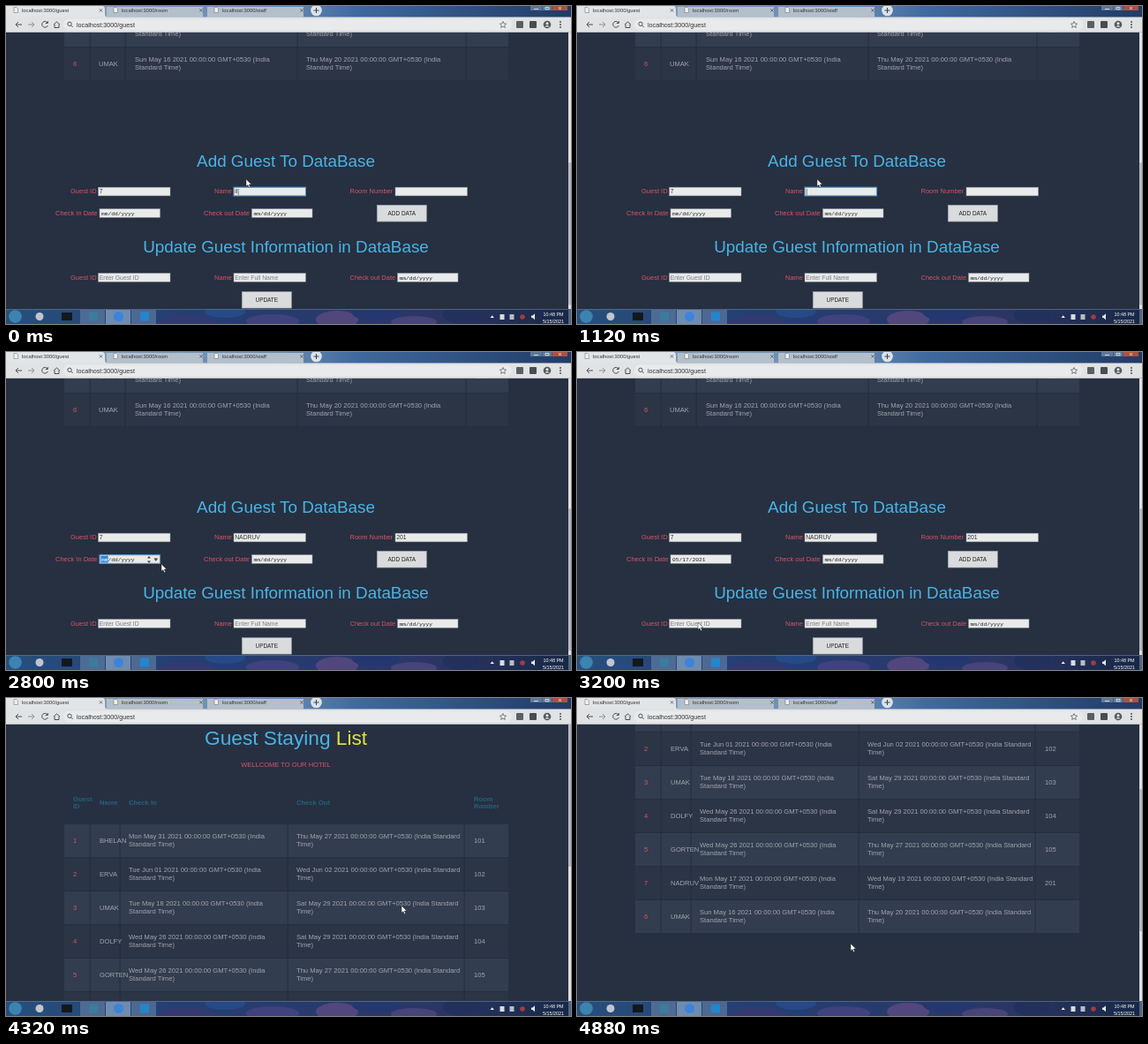
An HTML page for the animation above (4960 ms loop, 640 by 360 pixels).

```html
<!DOCTYPE html>
<html lang="en">
<head>
<meta charset="utf-8">
<title>Guest form</title>
<style>
html, body { margin: 0; width: 100%; height: 100%; overflow: hidden; background: #263041; }
svg { display: block; width: 640px; height: 360px; font-family: "Liberation Sans", Arial, sans-serif; }
.mono { font-family: "Liberation Mono", monospace; }
</style>
</head>
<body>
<svg id="stage" viewBox="0 0 640 360"></svg>
<script>
const LOOP = 4960, STEP = 80;
const PINK = '#d95266', BLUE = '#49b4e6', CELL = '#a4a3ad', INK = '#333', PAPER = '#e9eaea';

// Drawing helpers, all returning SVG markup
const rect = (x, y, w, h, fill, more = '') =>
  `<rect x="${x}" y="${y}" width="${w}" height="${h}" fill="${fill}" ${more}/>`;
const text = (x, y, size, fill, str, more = '') =>
  `<text x="${x}" y="${y}" font-size="${size}" fill="${fill}" ${more}>${str}</text>`;
const path = (d, stroke, more = '') => `<path d="${d}" fill="none" stroke="${stroke}" ${more}/>`;
const fill = (d, color, more = '') => `<path d="${d}" fill="${color}" ${more}/>`;
const dot = (x, y, r, color, more = '') => `<circle cx="${x}" cy="${y}" r="${r}" fill="${color}" ${more}/>`;
const shift = (x, y, body) => `<g transform="translate(${x} ${y})">${body}</g>`;
const middle = 'text-anchor="middle"', bold = 'font-weight="bold"';

// Timeline helpers
const latest = (keys, t) => keys.filter(k => k[0] <= t).pop()[1];
const typing = (start, word) => [...word].map((_, i) => [start + i * STEP, word.slice(0, i + 1)]);
const erasing = (start, word) => [...word].map((_, i) => [start + i * STEP, word.slice(0, -1 - i)]);

const GUEST = 'NADRUV';
const nameKeys = [[0, 'il'], ...erasing(160, 'il'), ...typing(400, 'ILVU'),
  ...erasing(800, 'ILVU'), ...typing(1280, GUEST)];
const roomKeys = [[0, ''], ...typing(2000, '201')];
const mouseKeys = [
  [0, 272, 196], [2240, 272, 196], [2640, 176, 240], [2880, 176, 240], [3120, 137, 306],
  [3200, 137, 306], [3440, 347, 239], [3600, 347, 239], [3840, 341, 306], [3920, 341, 306],
  [4160, 448, 235], [4320, 448, 235], [4560, 416, 223], [4720, 416, 223], [4880, 310, 278], [LOOP, 310, 278]
];
const ADDED = 4320;

function mouseAt(t) {
  const i = mouseKeys.findIndex(k => k[0] > t);
  const [t0, x0, y0] = mouseKeys[i - 1], [t1, x1, y1] = mouseKeys[i];
  const p = (t - t0) / (t1 - t0);
  return [x0 + (x1 - x0) * p, y0 + (y1 - y0) * p];
}

const guests = [
  [1, 'BHELAN', 'Mon May 31', 'Thu May 27', 101],
  [2, 'ERVA', 'Tue Jun 01', 'Wed Jun 02', 102],
  [3, 'UMAK', 'Tue May 18', 'Sat May 29', 103],
  [4, 'DOLFY', 'Wed May 26', 'Sat May 29', 104],
  [5, 'GORTEN', 'Wed May 26', 'Thu May 27', 105],
  [6, 'UMAK', 'Sun May 16', 'Thu May 20', '']
];
const newGuest = [7, GUEST, 'Mon May 17', 'Wed May 19', 201];

function dateCell(x, y, day, wide, color = CELL, more = '') {
  const stamp = `${day} 2021 00:00:00 GMT+0530 (India`;
  return text(x, y + 16.3, 7.6, color, stamp + (wide ? ' Standard' : ''), more) +
    text(x, y + 25.2, 7.6, color, wide ? 'Time)' : 'Standard Time)', more);
}

function table(added, hover) {
  const rows = added ? [...guests.slice(0, 5), newGuest, guests[5]] : guests;
  const edges = added ? [95, 129, 319, 519] : [95, 135, 330, 521];
  const [a, b, c, d, e] = added ? [76, 106, 139, 329, 530] : [76, 105, 146, 340, 532];
  const head = (x, y, s) => text(x, y, 7.6, '#23627f', s, bold);
  let out = text(225, 53.3, 22.7, BLUE, 'Guest Staying <tspan fill="#e4df45">List</tspan>') +
    text(317, 78, 7.55, PINK, 'WELLCOME TO OUR HOTEL', middle) +
    head(a, 117, 'Guest') + head(a, 125, 'ID') + head(b, 121, 'Name') + head(c, 121, 'Check In') +
    head(d, 121, 'Check Out') + head(e, 117, 'Room') + head(e, 125, 'Romber');
  rows.forEach(([id, name, from, to, room], i) => {
    const y = 143 + 38 * i, lit = hover && i === 2;
    out += rect(66, y, 503, 38, lit ? '#494d50' : i % 2 ? '#2b3546' : '#323d4f') +
      path(`M66 ${y + 37.5}H569` + edges.map(x => `M${x + .2} ${y}v38`).join(''), '#222c3b', 'stroke-width=".8"') +
      text(a, y + 21, 7.6, PINK, id) + text(b, y + 21, 7.6, CELL, name) +
      dateCell(c, y, from, false) + text(e, y + 21, 7.6, CELL, room);
    if (!lit) out += dateCell(d, y, to, added);
  });
  if (hover) out += rect(320, 217.2, 201.5, 38, '#8f8c30') + rect(320.7, 216.5, 201.3, 37.6, '#d0cf40') +
    dateCell(331.5, 217, guests[2][3], true, '#504e18', bold);
  return out;
}

function box(x, y, w, focused) {
  return rect(x, y + .2, w, 9.7, PAPER, `stroke="${focused ? '#5b93c2' : '#8d949c'}" stroke-width="${focused ? 1.1 : .5}"`);
}
const label = (x, y, s) => text(x, y, 7.5, PINK, s);
const field = (x, y, value, focused, color = INK) =>
  box(x, y, 81.5, focused) + text(x + 1.2, y + 7.4, 6.8, color, value + (focused ? '|' : ''));

function dateField(x, y, value, focused) {
  let out = box(x, y, 68.5, focused);
  if (focused) out += rect(x + 1.3, y + 1.2, 8.4, 7.8, '#3387d6') +
    fill(`M${x + 54} ${y + 4}l2-2.5 2 2.5zm0 3l2 2.5 2-2.5zM${x + 61.5} ${y + 4}h4.6l-2.3 3.4z`, '#444');
  return out + text(x + 2, y + 7.4, 6.25, '#222',
    focused ? '<tspan fill="#fff">mm</tspan>/dd/yyyy' : value || 'mm/dd/yyyy', 'class="mono"');
}

function button(x, y, s) {
  return rect(x, y, 56, 18.5, '#dadbdc', 'stroke="#a2a6ab" stroke-width=".7"') +
    text(x + 28, y + 11.8, 6.4, '#222', s, middle);
}

function form(s) {
  return text(317, 182.4, 18.85, BLUE, 'Add Guest To DataBase', middle) +
    label(73, 212, 'Guest ID') + field(104.5, 205, s.id, false) +
    label(236, 212, 'Name') + field(258, 205, s.name, s.focus === 'name') +
    label(389.5, 212, 'Room Number') + field(441, 205, s.room, s.focus === 'room') +
    label(56, 237, 'Check In Date') + dateField(106, 229.5, s.from, s.focus === 'from') +
    label(224, 237, 'Check out Date') + dateField(278.5, 229.5, s.to, s.focus === 'to') +
    button(420.3, 225.5, 'ADD DATA') +
    text(317, 279.4, 18.85, BLUE, 'Update Guest Information in DataBase', middle) +
    label(73, 309.5, 'Guest ID') + field(104.5, 302.3, 'Enter Guest ID', false, '#7d8083') +
    label(236, 309.5, 'Name') + field(258, 302.3, 'Enter Full Name', false, '#7d8083') +
    label(389.5, 309.5, 'Check out Date') + dateField(443.5, 302.3) +
    button(267.3, 323.5, 'UPDATE');
}

function calendar(x, y) {
  const colX = i => 13 + 16.2 * i;
  let out = rect(1, 1.5, 123, 96, '#0006') + rect(0, 0, 123, 96, '#e4e5e5', 'stroke="#aaa" stroke-width=".6"') +
    text(7, 14, 5.7, INK, 'May, 2021') + fill('M35 10.5h4l-2 2.5z', INK) +
    rect(5, 22, 113, 70, PAPER, 'stroke="#96a8ba" stroke-width=".6"') + rect(5.3, 22.3, 112.4, 11, '#cfd7df');
  [81, 94, 107].forEach((bx, i) => {
    out += rect(bx, 6, 10, 11, '#d6d7d8', 'stroke="#999" stroke-width=".6"') +
      (i === 1 ? dot(bx + 5, 11.5, 1.2, INK) :
        path(`M${bx + 5 + (i ? -.7 : .7)} 10.2l${i ? 1.4 : -1.4} 1.3 ${i ? -1.4 : 1.4} 1.3`, INK, 'stroke-width=".8"'));
  });
  ['Sun', 'Mon', 'Tue', 'Wed', 'Thu', 'Fri', 'Sat'].forEach((day, i) => {
    out += text(colX(i), 30, 5.8, '#444', day, middle);
  });
  for (let i = 0; i < 42; i++) {
    const n = i - 5, cx = colX(i % 7), cy = 41 + 9.6 * Math.floor(i / 7);
    const inside = n >= 1 && n <= 31;
    if (n === 15) out += rect(cx - 7.5, cy - 6.8, 15, 9.2, '#e3e9ef', 'stroke="#8fa3b8" stroke-width=".6"');
    out += text(cx, cy, 6.2, inside ? '#222' : '#b4b5b6', inside ? n : n < 1 ? n + 30 : n - 31, middle);
  }
  return shift(x, y, out);
}

function browserBar() {
  let out = rect(0, 0, 640, 13, 'url(#glass)') +
    fill('M114 12.5V1h109v11.5zM228 12.5V1h109v11.5z', '#b3bfca') + fill('M0 13V0H109q3 0 3 4v5q0 4 4 4z', '#e2e5e7');
  ['guest', 'room', 'staff'].forEach((page, i) => {
    const x = [18, 131, 245][i], end = [107.5, 221, 335][i];
    out += text(x, 6.8, 5.8, '#333', 'localhost:3000/' + page) +
      fill(`M${x - 9} 1.5h3l1.5 1.5v4.5h-4.5z`, '#eee', 'stroke="#666" stroke-width=".5"') +
      path(`M${end - 1.7} 3.2l3.4 3.4m0-3.4l-3.4 3.4`, '#555', 'stroke-width=".8"');
  });
  out += dot(351.5, 5, 6.3, '#dbe3ea') + path('M348.5 5h6m-3-3v6', '#444', 'stroke-width="1.1"') +
    rect(594, 0, 13, 5, '#5f7899') + rect(607.5, 0, 11, 5, '#5f7899') + rect(619, 0, 17, 5, '#b0503f') +
    path('M598 3.5h5M611 1.5h4v2.3h-4zM626 1l3 3m0-3l-3 3', '#eee', 'stroke-width=".8"') +
    rect(0, 12.5, 640, 17.3, '#e0e2e3') + rect(65, 14.5, 508, 13, '#e9eaeb', 'rx="6.5"') +
    path('M18 21h-7m3-3l-3 3 3 3M47 19a3.4 3.4 0 1 0 .3 3m0-5v2.5h-2.5M54 21l3.5-3 3.5 3M55 21v3.5h5V21', '#4c5053') +
    path('M25 21h7m-3-3l3 3-3 3', '#8d9194') +
    '<circle cx="72" cy="20.3" r="2.2" fill="none" stroke="#555"/>' + path('M73.7 22l2 2', '#555') +
    text(80, 23.5, 7.2, '#333', 'localhost:3000/guest') +
    path('M563 17.5l1.1 2.4 2.6.3-2 1.7.6 2.6-2.3-1.4-2.3 1.4.6-2.6-2-1.7 2.6-.3z', '#555', 'stroke-width=".7"') +
    rect(578, 17, 8, 8, '#5b5f62', 'rx="1"') + rect(593, 17, 8, 8, '#494d50', 'rx="1"') +
    dot(613, 21, 4.3, '#53585c') + dot(613, 19.8, 1.5, '#eee') + fill('M610.3 23.5q2.7-3 5.4 0z', '#eee');
  return out + [18, 21, 24].map(y => dot(628, y, .9, '#444')).join('');
}

function taskbar() {
  const blob = (x, y, rx, ry, color) => `<ellipse cx="${x}" cy="${y}" rx="${rx}" ry="${ry}" fill="${color}"/>`;
  return '<svg y="343" width="640" height="17" viewBox="0 343 640 17">' + rect(0, 343, 640, 17, 'url(#bar)') +
    blob(205, 359, 32, 9, '#333a70') + blob(248, 346, 23, 7, '#254a86') + blob(302, 357, 30, 8, '#40437b') +
    blob(375, 355, 24, 10, '#51477c') + blob(420, 348, 28, 8, '#24376f') + blob(462, 358, 26, 7, '#474479') +
    blob(515, 350, 20, 10, '#22305c') +
    rect(0, 343, 640, .7, '#5f7896') +
    rect(113, 344, 28, 16, '#9fbcd6', 'opacity=".6"') +
    rect(84, 344, 28, 16, '#7e98b4', 'opacity=".45"') + rect(142, 344, 28, 16, '#7e98b4', 'opacity=".45"') +
    dot(10.5, 351.5, 7.3, '#3d83b0') + dot(38, 351.5, 4.5, '#c3c4cd') + rect(63, 347, 12, 9, '#14181d') +
    rect(94, 346.5, 10, 10, '#3b7c9e') + dot(127.5, 351.5, 5.5, '#3e83da') + rect(152, 346.5, 10, 10, '#2585cb') +
    fill('M548.5 353l2.2-2.8 2.2 2.8z', '#eee') +
    rect(559.5, 349, 5, 6, '#d8dde2') + rect(570.5, 349, 5, 6, '#b5bdc7') +
    dot(585, 352, 2.8, '#a53a42') + fill('M595 350.5h1.5l2.5-2.2v7l-2.5-2.2h-1.5z', '#e7e9ed') +
    text(620, 350.7, 5.4, '#fff', '10:48 PM', middle) + text(620, 358.5, 5.4, '#fff', '5/15/2021', middle) +
    rect(637, 344, 3, 16, '#506784') + '</svg>';
}

const defs = `<defs>
  <linearGradient id="glass"><stop stop-color="#8ba5c0"/><stop offset=".5" stop-color="#6488b2"/><stop offset=".62" stop-color="#3f699f"/><stop offset="1" stop-color="#213b66"/></linearGradient>
  <linearGradient id="bar"><stop stop-color="#27507c"/><stop offset=".3" stop-color="#243f74"/><stop offset=".75" stop-color="#2c3666"/><stop offset="1" stop-color="#182846"/></linearGradient>
</defs>`;
const frameParts = browserBar() + taskbar();

function scene(t) {
  const added = t >= ADDED;
  const scroll = latest([[0, 286], [ADDED, 0], [4800, 76], [4880, 142]], t);
  const [mx, my] = mouseAt(t);
  const state = added ? { id: '', name: '', room: '' } : {
    id: '7', name: latest(nameKeys, t), room: latest(roomKeys, t),
    from: t >= 3200 && '05/17/2021', to: t >= 3920 && '05/19/2021',
    focus: latest([[0, 'name'], [1920, 'room'], [2720, 'from'], [3200, ''], [3520, 'to'], [3920, '']], t)
  };
  let out = defs + rect(0, 0, 640, 360, '#263041') +
    shift(0, -scroll, table(added, t >= 4560 && t < 4800) + shift(0, added ? 324 : 286, form(state)));
  if (t >= 2880 && t < 3200) out += calendar(106.5, 240.5);
  if (t >= 3600 && t < 3920) out += calendar(279, 240.5);
  return out + rect(637, 29.8, 3, 313.2, '#dfe1e2') + rect(637.3, 30 + scroll * .515, 2.7, 161, '#b3b7bb') + frameParts +
    shift(mx, my, fill('M0 0V8.3L1.9 6.6 3.2 9.5 4.6 8.9 3.3 6.1H5.9Z', '#fff', 'stroke="#222" stroke-width=".5"'));
}

const stage = document.getElementById('stage');
let shown = -1;
function tick() {
  const t = Math.floor(performance.now() % LOOP / STEP) * STEP;
  if (t !== shown) stage.innerHTML = scene(shown = t);
  requestAnimationFrame(tick);
}
tick();
</script>
</body>
</html>
```
